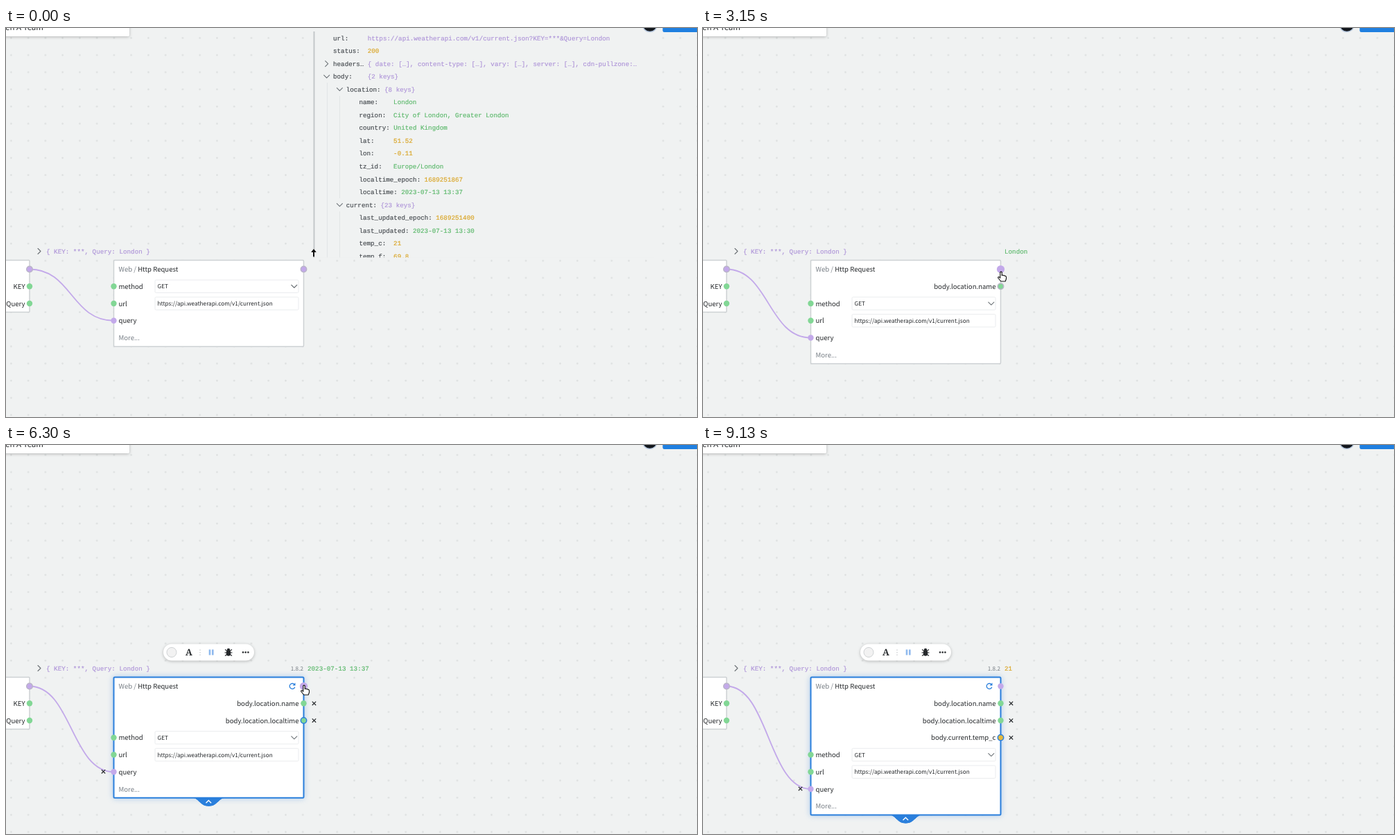
Animation, 997 px wide and 562 px high, one loop 9720 ms. Source, as an HTML page:

```html
<!DOCTYPE html>
<html lang="en">
<head>
<meta charset="utf-8">
<title>Http Request node</title>
<style>
html, body { margin: 0; width: 100%; height: 100%; overflow: hidden; background: #f0f2f2; }
svg { display: block; width: 997px; height: 562px; }
text {
  font: 9.57px "Noto Sans CJK JP", "Noto Sans CJK SC", "Noto Sans", sans-serif;
  fill: #25282b; text-rendering: geometricPrecision; white-space: pre;
}
.small { font-size: 8.23px; }
.dim { fill: #787f86; }
.end { text-anchor: end; }
.mono { font: 9.26px "Liberation Mono", "Courier New", monospace; stroke-width: .15px; }
.key { fill: #43484d; stroke: #43484d; }
.hot { fill: #2b7fdb; stroke: #2b7fdb; }
.str { fill: #58b768; stroke: #58b768; }
.num { fill: #d9a423; stroke: #d9a423; }
.obj { fill: #ad93d8; stroke: #ad93d8; }
.line { fill: none; stroke: #6d7378; stroke-width: 1.1; stroke-linecap: round; stroke-linejoin: round; }
.card { fill: #fff; stroke: #cdd1d4; stroke-width: 1.5; }
.picked { stroke: #2a7fdc; stroke-width: 2; filter: drop-shadow(0 0 4px rgba(42, 127, 220, .35)); }
.field { fill: #fff; stroke: #eaecee; }
.soft { filter: drop-shadow(0 1px 2px rgba(0, 0, 0, .25)); }
</style>
</head>
<body>
<svg viewBox="0 0 997 562" xmlns="http://www.w3.org/2000/svg">
  <defs>
    <pattern id="dots" x="-5" y="2" width="24.757" height="24.757" patternUnits="userSpaceOnUse">
      <circle cx="12.38" cy="12.38" r="1.2" fill="#dadddd"/>
    </pattern>
    <clipPath id="view"><rect x="440" y="0" width="500" height="331.5"/></clipPath>
  </defs>
  <rect width="997" height="562" fill="#f0f2f2"/>
  <rect width="997" height="562" fill="url(#dots)"/>
  <g id="flow"></g>
  <g id="panel" clip-path="url(#view)"></g>
  <g id="bar">
    <rect class="soft" x="-10" y="-20" width="188" height="32" rx="2" fill="#fff"/>
    <text x="54" y="2.5" class="end" style="font-size:11.5px;font-weight:500">then A Team</text>
    <circle cx="929" cy="-5" r="10.5" fill="#12161c" stroke="#b3c4da" stroke-width="1.4"/>
    <rect x="947.5" y="-20" width="70" height="26" rx="2.5" fill="#1f7fe0"/>
  </g>
  <g id="cursor"></g>
</svg>
<script>
const LOOP = 9720, ROW = 24.757, TOP = 348.5, LEFT = 155.5, RIGHT = 429.5;
const LINE = 18.55, CHAR = 5.556;
const GREEN = '#82d795', PURPLE = '#c3a9ea', YELLOW = '#e6b93c', BLUE = '#2a7fdc';
const el = id => document.getElementById(id);

// indent, key, value, value class, chevron
const rows = [
  [0, 'url:', 'https://api.weatherapi.com/v1/current.json?KEY=***&amp;Query=London', 'obj'],
  [0, 'status:', '200', 'num'],
  [0, 'headers…', '{ date: […], content-type: […], vary: […], server: […], cdn-pullzone:…', 'obj', 'shut'],
  [0, 'body:', '{2 keys}', 'obj', 'open'],
  [1, 'location:', '{8 keys}', 'obj', 'open'],
  [2, 'name:', 'London', 'str'],
  [2, 'region:', 'City of London, Greater London', 'str'],
  [2, 'country:', 'United Kingdom', 'str'],
  [2, 'lat:', '51.52', 'num'],
  [2, 'lon:', '-0.11', 'num'],
  [2, 'tz_id:', 'Europe/London', 'str'],
  [2, 'localtime_epoch:', '1689251867', 'num'],
  [2, 'localtime:', '2023-07-13 13:37', 'str'],
  [1, 'current:', '{23 keys}', 'obj', 'open'],
  [2, 'last_updated_epoch:', '1689251400', 'num'],
  [2, 'last_updated:', '2023-07-13 13:30', 'str'],
  [2, 'temp_c:', '21', 'num'],
  [2, 'temp_f:', '69.8', 'num']
];

const outputs = [
  ['body.location.name', GREEN, 'London', 'str'],
  ['body.location.localtime', GREEN, '2023-07-13 13:37', 'str'],
  ['body.current.temp_c', YELLOW, '21', 'num']
];

// start, step length, step count, then a bezier from the last place (or one point to jump to)
const moves = [
  [0, 1, 1, 444, 325],
  [600, 150, 7, 480, 230, 522, 130, 525, 111],
  [1650, 1, 1, 524, 108],
  [2100, 1, 1, 511.5, 107.5],
  [2400, 150, 6, 500, 180, 450, 310, 430, 352],
  [4050, 150, 6, 600, 270, 440, 200, 537, 239],
  [5100, 1, 1, 523.5, 239.5],
  [5400, 150, 7, 510, 270, 460, 325, 430, 347],
  [6598, 148, 5, 450, 340, 490, 325, 522, 313.5],
  [7340, 1, 1, 515.5, 313.5],
  [7940, 147.5, 5, 540, 350, 620, 440, 666.5, 464.5],
  [8980, 1, 1, 772.5, 487.5]
];

const text = (x, y, s, cls = '') => `<text x="${x}" y="${y}" class="${cls}">${s}</text>`;
const mono = (x, y, s, cls) => text(x, y + 3, s, 'mono ' + cls);
const label = (x, y, s, cls) => text(x, y + 3.6, s, cls);
const path = (d, attrs = 'class="line"') => `<path d="${d}" ${attrs}/>`;
const port = (x, y, fill, r = 4.2, ring = '') =>
  `<circle cx="${x}" cy="${y}" r="${r}" fill="${fill}"${ring && ` stroke="${ring}" stroke-width="1.5"`}/>`;
const chevron = (x, y, kind) =>
  path(kind === 'shut' ? `M${x - 2} ${y - 4}l4 4-4 4` : `M${x - 4} ${y - 2}l4 4 4-4`);
const cross = (x, y) => path(`M${x - 2.7} ${y - 2.7}l5.4 5.4m0-5.4l-5.4 5.4`,
  'stroke="#25282b" stroke-width="1.2" fill="none"');

const keyX = row => 472 + row[0] * 18.7;
const valueX = row => keyX(row) + Math.max(49.7, row[1].length * CHAR + 5.3);

function place(t) {
  let x = 0, y = 0;
  for (const [start, step, count, ...p] of moves) {
    if (t < start) break;
    if (p.length === 2) { [x, y] = p; continue; }
    const k = Math.min(1, Math.floor((t - start) / step + 1.0001) / count);
    const s = k * k * (3 - 2 * k), u = 1 - s;
    const mix = (a, b, c, d) => u * u * u * a + 3 * u * u * s * b + 3 * u * s * s * c + s * s * s * d;
    [x, y] = [mix(x, p[0], p[2], p[4]), mix(y, p[1], p[3], p[5])];
  }
  return [x, y];
}

function stateAt(t) {
  const [x, y] = place(t);
  const open = t < 1950 || (t >= 3750 && t < 5100) || (t >= 6450 && t < 7340);
  const outs = t < 1950 ? 0 : t < 5100 ? 1 : t < 7340 ? 2 : 3;
  const handle = open && Math.abs(x - 444.5) < 4 && y < 331;
  const onPort = Math.hypot(x - RIGHT, y - TOP) < 8;
  let hover = -1, onKey = false;
  if (open && !handle && x > 449 && y < 331) {
    hover = Math.round((y - 14.5) / LINE);
    const row = rows[hover];
    if (row[0] === 2 && x < keyX(row) - 5) hover = hover > 13 ? 13 : 4;
    else onKey = x > keyX(row) - 5 && x < keyX(row) + row[1].length * CHAR;
  }
  const shape = t >= 9130 ? 'none' : handle ? 'up' : onKey ? 'right'
    : onPort ? 'point' : hover >= 0 ? 'arrow' : 'grab';
  return { x, y, open, outs, handle, onPort, hover, shape, picked: t >= 3750 };
}

function drawPanel(s) {
  if (!s.open) return '';
  let out = '<rect x="445" y="0" width="490" height="332" fill="#f0f2f2"/>';
  out += path('M444.5 5V332', s.handle ? 'stroke="#c3c7c9" stroke-width="2"' : 'stroke="#dfe2e3"');
  out += path('M463.5 79V332M481.5 98V246M481.5 265V332', 'stroke="#e2e5e6"');
  rows.forEach((row, i) => {
    const y = 14.5 + i * LINE, x = keyX(row), v = valueX(row);
    if (row[4]) out += chevron(x - 9.3, y, row[4]);
    out += mono(x, y, row[1], i === s.hover ? 'hot' : 'key') + mono(v, y, row[2], row[3]);
    if (i === s.hover) {
      const c = v + row[2].length * CHAR + 5.2;
      out += `<rect x="${c}" y="${y - 3.5}" width="7" height="8" rx="1" class="line"/>`
        + path(`M${c + 2} ${y - 3.7}h3`, 'stroke="#6d7378" stroke-width="2"');
    }
  });
  return out;
}

function drawTools() {
  let out = '<rect class="soft" x="227" y="287.5" width="131" height="24" rx="12" fill="#fff"/>'
    + '<circle cx="239" cy="299.5" r="7" fill="#f2f2f2" stroke="#cfd2d4"/>'
    + '<text x="264" y="304" text-anchor="middle" style="font:bold 13px \'Noto Serif\',serif">A</text>'
    + path('M280 295.5v9', 'stroke="#c5c9cc" stroke-width="1.2" stroke-dasharray="1.5 2"')
    + path('M294 295.5v8m4.3-8v8', 'stroke="#8fbaee" stroke-width="2.6"')
    + path('M316 295.5l3 2m7-2l-3 2M315.5 300h11M316 304.500l3-2m7 2l-3-2', 'stroke="#25282b" stroke-width="1.2"')
    + '<ellipse cx="321" cy="300.500" rx="3.3" ry="4.300" fill="#25282b"/><circle cx="321" cy="296" r="2.200" fill="#25282b"/>';
  for (const x of [342, 345.7, 349.4]) out += port(x, 299.5, '#25282b', 1.3);
  return out;
}

function drawFlow(s) {
  const rowY = n => TOP + n * ROW;
  const first = s.outs + 1, query = rowY(first + 2), bottom = rowY(first + 3) + 12.7;
  const ringColor = s.picked ? BLUE : '#b9b4c8';
  const ring = s.open ? 0 : s.outs;

  let out = '<rect class="card" x="-20" y="335.5" width="54" height="75" rx="1"/>'
    + label(27.5, rowY(1), 'KEY', 'end') + label(27.5, rowY(2), 'Query', 'end')
    + chevron(48, 322.5, 'shut') + mono(58, 322.5, '{ KEY: ***, Query: London }', 'obj');

  if (s.picked) {
    out += path(`M269 ${bottom}c9 0 11 12 23.500 12s14.500-12 23.500-12z`, `fill="${BLUE}"`)
      + drawTools() + label(429, 322, '1.8.2', 'small dim end');
  }
  out += `<rect class="card ${s.picked ? 'picked' : ''}" x="${LEFT}" y="335.5" width="274" height="${bottom - 335.5}" rx="1.5"/>`;
  if (s.picked) {
    out += path(`M269 ${bottom}c9 0 11 12 23.500 12s14.500-12 23.500-12z`, `fill="${BLUE}"`)
      + path(`M288.500 ${bottom + 7.5}l3.800-3.800 3.800 3.800`, 'fill="none" stroke="#fff" stroke-width="1.400"')
      + path('M416.200 346a3.900 3.900 0 1 0 .600 3.700', `fill="none" stroke="${BLUE}" stroke-width="1.300"`)
      + path('M417.500 343.500v4h-4z', `fill="${BLUE}"`);
  }
  out += path(`M34 ${TOP}C94.5 ${TOP} 94.5 ${query} ${LEFT} ${query}`,
    `fill="none" stroke="${PURPLE}" stroke-width="1.8"`);
  out += port(34, TOP, PURPLE, 4.3, '#b9b4c8') + port(34, rowY(1), GREEN) + port(34, rowY(2), GREEN);

  out += label(162.5, TOP, '<tspan class="dim">Web / </tspan>Http Request');
  ['method', 'url', 'query'].forEach((name, i) => {
    const y = rowY(first + i);
    out += label(162.5, y, name) + port(LEFT, y, i < 2 ? GREEN : PURPLE);
    if (i < 2) {
      out += `<rect class="field" x="215" y="${y - 9.2}" width="207" height="18.4" rx="1.5"/>`
        + text(218.5, y + 3.1, i ? 'https://api.weatherapi.com/v1/current.json' : 'GET', 'small');
    }
  });
  out += chevron(415.8, rowY(first), 'open') + label(162.5, rowY(first + 3), 'More...', 'dim');

  out += port(RIGHT, TOP, PURPLE, s.onPort && !s.open ? 5.6 : 4.2, ring === 0 ? ringColor : '');
  outputs.slice(0, s.outs).forEach(([name, fill], i) => {
    const y = rowY(i + 1);
    out += label(422.5, y, name, 'end') + port(RIGHT, y, fill, 4.2, ring === i + 1 ? ringColor : '');
    if (s.picked) out += cross(444.5, y);
  });
  if (s.picked) out += cross(140.5, query - .5);
  if (ring) out += mono(435, 322.5, outputs[ring - 1][2], outputs[ring - 1][3]);
  return out;
}

const inked = 'fill="#111" stroke="#fff" stroke-width=".9" paint-order="stroke" stroke-linejoin="round"';
const pale = 'fill="#fff" stroke="#111" stroke-width="1.1" stroke-linejoin="round"';
const straight = path('M-5.5-1H1V-3.8L6 0 1 3.8V1H-5.500z', inked);
const shapes = {
  none: '',
  right: straight,
  up: `<g transform="rotate(-90)">${straight}</g>`,
  arrow: path('M0 0V13l3-2.700 2 4.700 2-.900-2-4.500h4z', inked),
  point: path('M-1.200 .800Q0-.600 1.300 .800V5.500Q2.600 4.500 3.600 5.800 5 5 5.800 6.400 7.400 6 7.500 7.800V10.500L6.200 14H-.200L-4.300 9Q-4.600 7.400-2.900 7.700L-1.200 9.200z', pale),
  grab: path('M-2.600 5L-5 .800Q-4.600-.700-3.200 .500L-3.700-3Q-2.800-4.600-1.900-3.200L-1.500-4.500Q-.400-5.700 .500-4.500 2-5.400 2.500-3.600 4.200-4 4.400-2.200 5.200-1 4.500 1.800L3.300 5z', pale)
};

const shown = {};
function put(id, html) {
  if (shown[id] !== html) el(id).innerHTML = shown[id] = html;
}

const begin = performance.now();
function frame() {
  const s = stateAt((performance.now() - begin) % LOOP);
  put('flow', drawFlow(s));
  put('panel', drawPanel(s));
  put('cursor', `<g transform="translate(${s.x.toFixed(1)} ${s.y.toFixed(1)})">${shapes[s.shape]}</g>`);
  requestAnimationFrame(frame);
}
frame();
</script>
</body>
</html>
```
